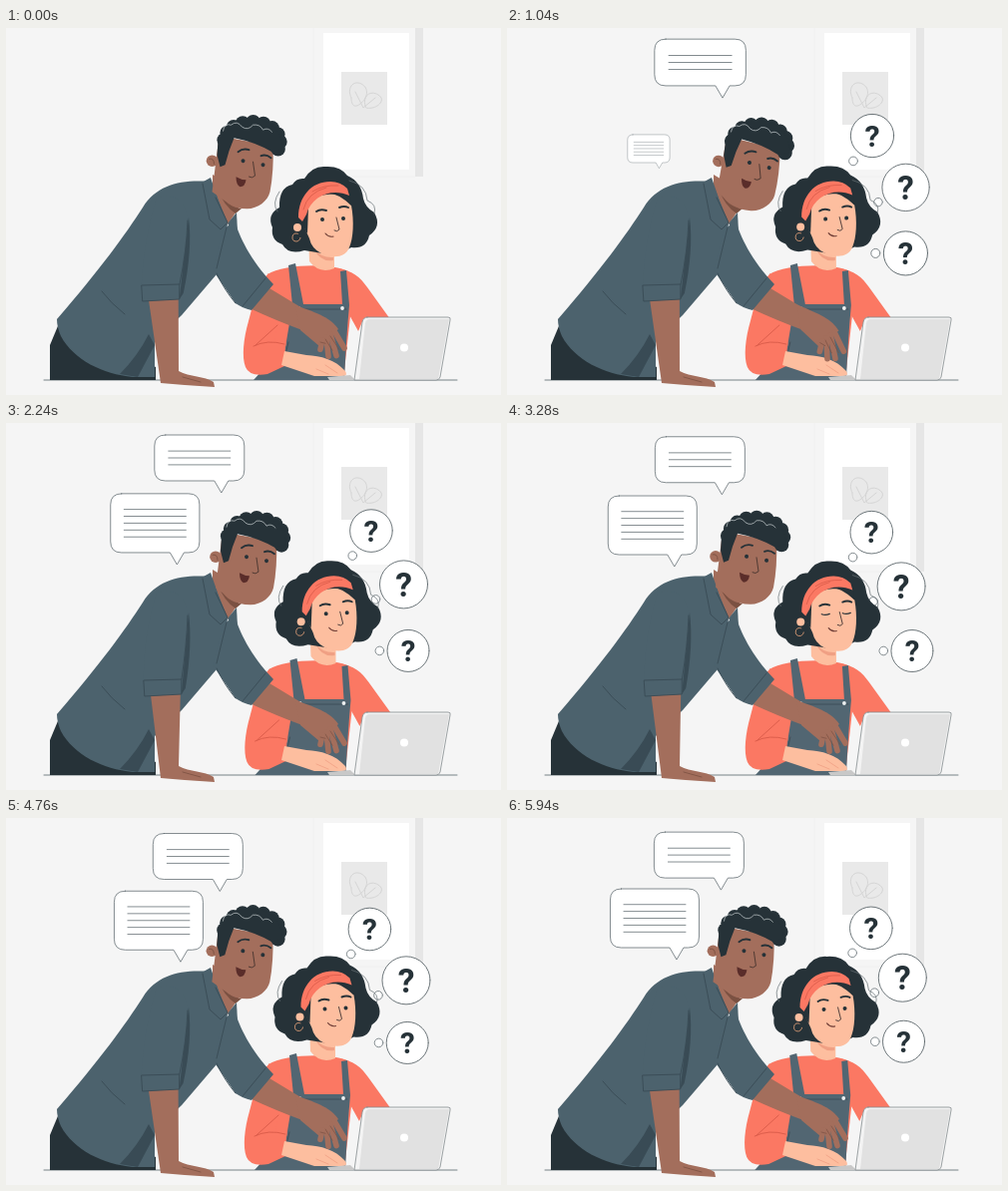
Write an HTML page with a canvas that moves like this. It is 496 px wide and 368 px high and loops after 6010 ms.

```html
<!DOCTYPE html>
<html lang="en">
<head>
<meta charset="utf-8">
<title>Questions at the laptop</title>
<style>
html, body { margin: 0; width: 100%; height: 100%; overflow: hidden; background: #f5f5f5; }
canvas { display: block; width: 496px; height: 368px; }
</style>
</head>
<body>
<canvas id="stage" width="496" height="368"></canvas>
<script>
const ctx = document.getElementById('stage').getContext('2d');
const LOOP = 6010, FRAMES = 86, STEP = LOOP / FRAMES;
const INK = '#263238', SHIRT = '#4c626d', SHADE = '#394b55', DENIM = '#526672';
const BROWN = '#a36e5c', BROWN_DARK = '#7b5142', CORAL = '#fb7863', CORAL_DARK = '#d95b49';
const PEACH = '#fdbe9f', PEACH_DARK = '#f0a084', RULE = '#667075';

function fill(d, color) {
  ctx.fillStyle = color;
  ctx.fill(new Path2D(d));
}

function line(d, color, width = 1) {
  ctx.strokeStyle = color;
  ctx.lineWidth = width;
  ctx.lineCap = ctx.lineJoin = 'round';
  ctx.stroke(new Path2D(d));
}

function disc(x, y, r, color, edge) {
  ctx.beginPath();
  ctx.arc(x, y, r, 0, Math.PI * 2);
  ctx.fillStyle = color;
  ctx.fill();
  if (edge) {
    ctx.strokeStyle = edge;
    ctx.lineWidth = 0.8;
    ctx.stroke();
  }
}

// Turns and scales a drawing about the point (x, y).
function about(x, y, draw, scale = 1, angle = 0) {
  ctx.save();
  ctx.translate(x, y);
  ctx.rotate(angle);
  ctx.scale(scale, scale);
  ctx.translate(-x, -y);
  draw();
  ctx.restore();
}

const smooth = u => u * u * (3 - 2 * u);

const wave = (t, mid, amp, peak, period = LOOP) =>
  mid + amp * Math.cos(2 * Math.PI * (t - peak) / period);

// Springy growth from 0 to 1.
function pop(t, start) {
  const u = (t - start) / 1000;
  return u <= 0 ? 0 : 1 - Math.exp(-5 * u) * Math.cos(7 * u);
}

function bump(t, rise, peak, fall) {
  if (t <= rise || t >= fall) return 0;
  return smooth(t < peak ? (t - rise) / (peak - rise) : (fall - t) / (fall - peak));
}

function wall() {
  ctx.fillStyle = '#f5f5f5';
  ctx.fillRect(0, 0, 496, 368);
  line('M308 0V149H410', '#efefef', 0.8);
  fill('M410 0H418V149H410z', '#e6e6e6');
  fill('M318 5H404V142H318z', '#fff');
  fill('M336 44H382V97H336z', '#e9e9e9');
  line('M346 70C341 60 348 52 356 56S363 70 355 76S346 74 346 70M360 78C357 68 365 62 373 67S373 79 367 80S360 80 360 78M350 64L358 80L370 70', '#d5d5d5', 1);
}

function speech(x, y, w, h, rows, scale) {
  if (scale <= 0) return;
  about(x - 20, y + h / 2 + 12, () => {
    ctx.translate(x, y);
    const a = w / 2, b = h / 2, r = 11;
    const d = `M${r - a} ${-b}H${a - r}Q${a} ${-b} ${a} ${r - b}V${b - r}Q${a} ${b} ${a - r} ${b}`
      + `H29L22 ${b + 12}L15 ${b}H${r - a}Q${-a} ${b} ${-a} ${b - r}V${r - b}Q${-a} ${-b} ${r - a} ${-b}z`;
    fill(d, '#fff');
    line(d, RULE, 0.8);
    for (let i = 0; i < rows; i++) line(`M-31 ${(i - (rows - 1) / 2) * 6.9}H31`, RULE, 0.8);
  }, scale);
}

function question(x, y, r, dx, dy, scale) {
  if (scale <= 0) return;
  about(x + dx, y + dy, () => {
    disc(x + dx, y + dy, 4.3, '#fff', RULE);
    disc(x, y, r, '#fff', '#4a555a');
    const size = r * 1.4;
    ctx.fillStyle = INK;
    ctx.font = `700 ${size}px Roboto, sans-serif`;
    ctx.textAlign = 'center';
    ctx.fillText('?', x, y + size * 0.36);
  }, scale);
}

function eye(x, y, closed, tilt) {
  ctx.save();
  ctx.translate(x, y);
  ctx.rotate(tilt);
  if (closed > 0.6) line('M-4 0Q0 1.6 4 0', INK, 1.2);
  else {
    ctx.scale(1, 1 - closed * 0.8);
    disc(0, 0, 2, INK);
  }
  ctx.restore();
}

function womanBody(sway) {
  ctx.save();
  ctx.translate(sway * 0.4, 0);
  fill('M332 241C347 243 355 250 362 260L385 292H358L353 304L342 284z', CORAL);
  fill('M262 247C277 237 326 235 343 244L346 280L338 353H262z', CORAL);
  fill('M303 205L304 234Q314 247 329 241L329 225z', PEACH);
  fill('M309 222Q317 231 328 230L328 233Q315 235 309 222z', PEACH_DARK);
  fill('M283 238L290 236L298 277H337L335 244L341 243L344 278Q341 310 339 353H248L258 342Q281 329 281 314L287 278z', DENIM);
  line('M290 282H341M299 291Q300 307 313 309M283 315L278 337', SHADE, 0.8);
  disc(293, 281, 1.9, '#edf0f1');
  disc(337, 281, 1.9, '#edf0f1');
  fill('M263 246C251 258 248 276 243 294C238 311 236 330 240 340Q244 350 262 347L279 339L280 318L269 314L273 292z', CORAL);
  line('M248 319Q262 312 279 317M250 318L272 298', CORAL_DARK, 0.9);
  ctx.restore();
  fill('M279 324L301 328C316 329 329 332 340 344Q343 349 337 349H309L276 338z', PEACH);
  line('M311 342L323 347M320 338L332 346', PEACH_DARK, 0.8);
}

function womanHead(sway, blink) {
  ctx.save();
  ctx.translate(sway, -sway * 0.2);
  fill('M299 151Q307 138 320 139Q335 138 342 148Q356 154 358 171Q360 180 369 185Q377 199 364 208Q361 222 346 220L330 228L299 223Q283 228 277 217Q265 213 267 200Q261 187 274 180Q273 160 287 157Q291 150 299 151z', INK);
  line('M344 153Q361 157 362 173Q372 177 369 186M274 164Q266 176 272 184', RULE, 0.7);
  fill('M300 181C302 170 321 164 337 168L346 178C349 194 348 211 344 220C340 231 327 231 316 226Q306 221 304 211L299 200z', PEACH);
  disc(292, 200, 4, PEACH);
  ctx.beginPath();
  ctx.arc(291, 210, 4, 0.1, 5.1);
  ctx.strokeStyle = '#d99a74';
  ctx.lineWidth = 0.9;
  ctx.stroke();
  fill('M297 188L303 180L302 206Q297 201 297 188z', INK);
  fill('M318 166Q330 163 346 178L344 163L320 160z', INK);
  fill('M293 190C293 169 306 154 325 154Q335 154 342 161L344 168C327 160 306 168 301 187L297 194z', CORAL);
  line('M298 182Q302 165 321 160M307 164Q318 157 333 158', CORAL_DARK, 0.8);
  line('M311 184Q315 181 321 183M334 180Q339 178 343 180', INK, 1.9);
  eye(317, 192, blink, -0.04);
  eye(338, 191, blink, -0.04);
  line('M331 190L334 202Q332 205 329 203', '#54413d', 1);
  line('M320 206Q323 210 328 209', '#6d3c35', 1.1);
  ctx.restore();
}

function laptop() {
  fill('M322 350L345 348L350 353H324z', '#c8c8c8');
  const shell = 'M362 290H443Q446 290 445 293L435 350Q434 353 431 353H349L357 295Q358 290 362 290z';
  fill(shell, '#f3f3f3');
  line(shell, '#858c8f', 0.8);
  fill('M364 292H444L433 352H354L360 296Q361 292 364 292z', '#e1e1e1');
  disc(399, 320.5, 4, '#fff');
}

function manHand(nod) {
  about(302, 292, () => {
    fill('M290 278C313 286 326 291 333 302L314 319L295 303z', BROWN);
    for (let i = 0; i < 4; i++) {
      const tipY = 321 + 9 * Math.sin(i) + 8 * nod;
      line(`M${329 - 4 * i} ${304 + 3 * i}L${339 - 8 * i} ${tipY}`, BROWN, 5.6);
      if (i) line(`M${330 - 5 * i} ${306 + 3 * i}L${341 - 7 * i} ${tipY - 6}`, BROWN_DARK, 0.7);
    }
  }, 1, 0.3 * nod);
}

function manBody(shift, nod) {
  fill('M54 294L44 318V353H150V340z', INK);
  fill('M207 147L207 164L222 197L233 181L235 164z', BROWN);
  fill('M213 163Q220 179 236 181L230 186Q218 178 213 163z', BROWN_DARK);
  fill('M203 154C176 152 151 157 137 180C119 208 95 241 51 292Q51 300 55 309C68 333 97 347 127 350H149V314L176 288L211 247L222 197L207 158z', SHIRT);
  fill('M143 307L149 318L132 350L114 347Q132 329 143 307z', SHADE);
  fill(`M183 190L${174 + shift} 272L${178 + shift} 266Q187 222 183 190z`, SHADE);
  line('M96 264Q105 276 119 287', SHADE, 0.9);

  const cuff = 136 + shift, arm = 143 + shift;
  fill(`M${arm} 271H${arm + 30}L173 344C184 350 199 349 208 355L209 360L179 358L155 356z`, BROWN);
  line('M177 350L195 355', BROWN_DARK, 0.8);
  fill(`M151 170Q180 163 182 194Q181 223 ${cuff + 38} 258V272L${cuff + 1} 274L${cuff} 258Q138 211 151 170z`, SHIRT);
  line(`M182 193Q181 223 ${cuff + 38} 258V272L${cuff + 1} 274L${cuff} 258L${cuff + 38} 257`, SHADE, 0.9);

  fill('M248 274L264 261L302 284L306 306L297 303Q272 294 244 281z', BROWN);
  manHand(nod);
  fill('M218 202L229 193C234 209 244 232 268 257L246 283Q237 281 230 276L208 244z', SHIRT);
  line('M260 251L237 279M211 246Q219 263 230 276M221 200L211 241', SHADE, 0.9);

  fill('M196 155L205 150L213 173L222 195L215 202L203 192z', SHIRT);
  line('M197 156L204 192L215 202L222 195L210 170', SHADE, 0.9);
  fill('M222 196L231 185L232 204L226 202z', SHIRT);
}

function manHead(sway, nod, blink) {
  ctx.save();
  ctx.translate(sway + 4 * nod, Math.abs(sway) * 0.4 + nod);
  about(215, 185, () => {
    fill('M214 108L268 118Q269 143 265 164C263 173 253 181 242 181Q230 181 224 176L207 164L210 140z', BROWN);
    disc(207, 133, 5.8, BROWN);
    line('M204 131Q209 130 209 136', BROWN_DARK, 0.9);
    for (let i = 0; i < 10; i++) {
      const a = -3.05 + i * 0.38;
      disc(247 + 28 * Math.cos(a), 114 + 20 * Math.sin(a), 7.2, INK);
    }
    fill('M213 112Q220 92 247 90Q274 92 278 120L267 124Q250 114 229 110L224 123L220 137L215 139L212 127z', INK);
    line('M218 103Q219 95 226 97Q232 92 237 99Q243 103 248 97Q255 96 258 102Q263 99 267 104', '#c9d0d2', 0.7);
    line('M233 124Q238 120 244 122M256 128Q261 126 266 130', INK, 1.9);
    eye(238, 133, blink, 0.18);
    eye(258, 137, blink, 0.18);
    line('M248 134L250 148Q247 151 244 149', '#503a33', 1);
    fill('M231 149Q236 152 241 152Q240 159 235 159Q231 157 231 149z', '#5a2d2a');
  }, 1, 0.3 * nod);
  ctx.restore();
}

function render(t) {
  const womanSway = wave(t, 1.9, -1.9, 0, 1440);
  const manSway = wave(t, 1, 2, 2300);
  const nod = bump(t, 60, 629, 1200);

  wall();
  speech(wave(t, 193, 0.8, 2240), wave(t, 36.6, -1.9, 1700), 90, 46, 3, pop(t, 430));
  speech(wave(t, 149.3, 3.7, 1360, 3500), wave(t, 101.2, 2, 4100), 89, 59, 5, pop(t, 960));
  question(wave(t, 365.2, 0.8, 1900), wave(t, 109.7, -1.8, 1800), 21.3, -18.7, 25, pop(t, 425));
  question(wave(t, 398, 3, 1500, 3300), wave(t, 161.8, 2.3, 3700), 24, -28, 15, pop(t, 220));
  question(wave(t, 401.5, 4.5, 3400), wave(t, 226.5, 2.3, 2800), 21, -28.7, 0, pop(t, 500));

  line('M38 353H452', '#68747a', 0.9);
  womanBody(womanSway);
  womanHead(womanSway, bump(t, 3100, 3285, 3470));
  laptop();
  manBody(manSway * 0.6 - 6 * nod, nod);
  manHead(manSway, nod, bump(t, 380, 629, 850));
}

const begin = performance.now();
function tick(now) {
  const t = Math.max(0, now - begin) % LOOP;
  render(Math.min(FRAMES - 1, Math.floor((t + 10) / STEP)) * STEP);
  requestAnimationFrame(tick);
}
tick(begin);
</script>
</body>
</html>
```
